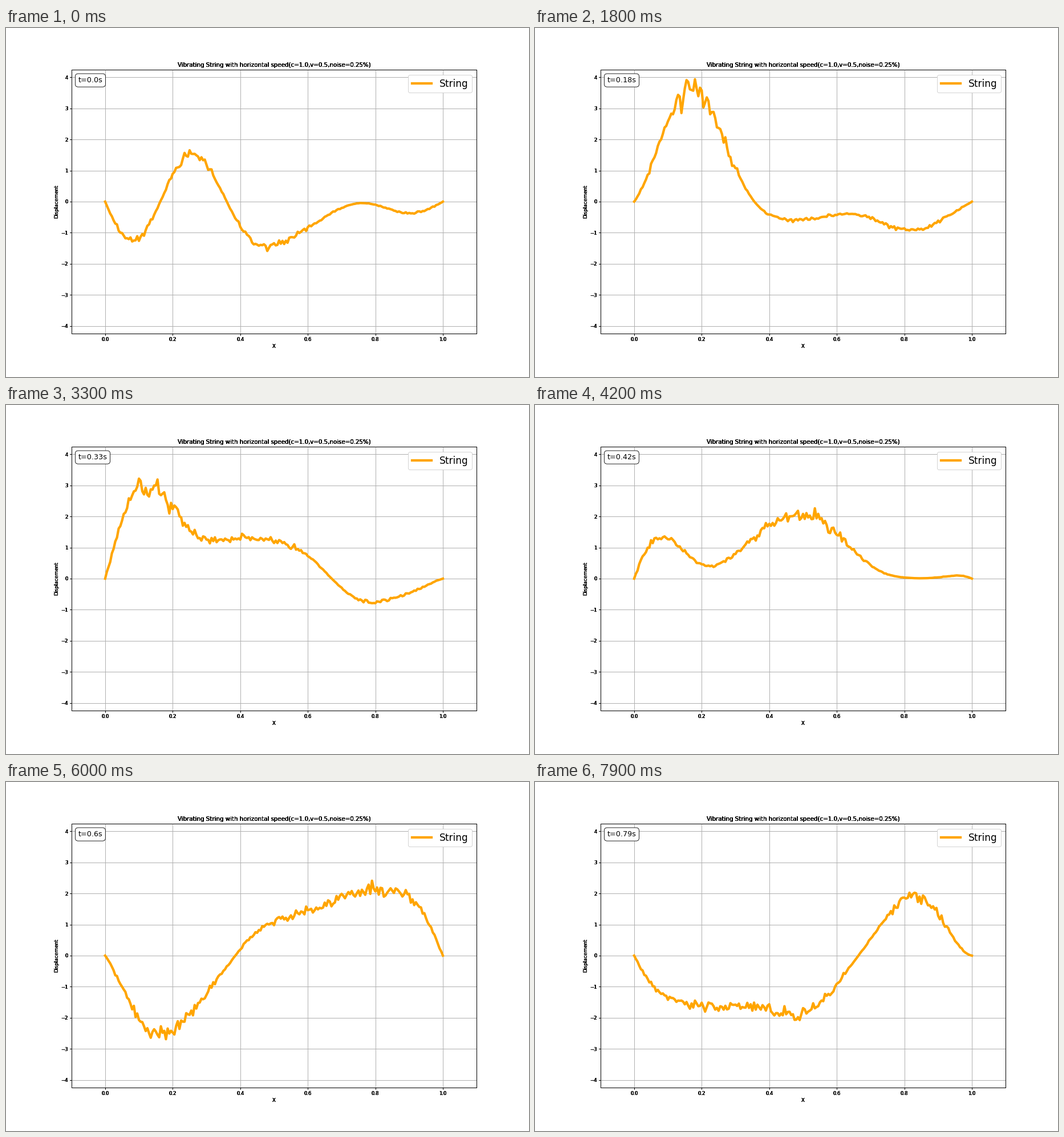
Animation of 917 by 611 pixels, one loop 8000 ms. Source, as a matplotlib script:

```python
import numpy as np
import matplotlib.pyplot as plt
from matplotlib.animation import FuncAnimation

np.random.seed(7)

DPI = 61.125
FRAMES, INTERVAL, DT = 80, 100, 0.01
C, V, NOISE = 1.0, 0.5, 0.05   # wave speed, transport speed, relative jitter
MODES = np.arange(1, 7)
LAYERS = 5                     # repeated drawing gives the heavy axis text


def basis(x, t):
    """Modes of a string fixed at both ends while travelling at speed V."""
    x, t = np.broadcast_arrays(x, t)
    phase = np.pi * (V * x + (C**2 - V**2) * t)[..., None] / C * MODES
    shape = np.sin(np.pi * x[..., None] * MODES)
    return np.concatenate([shape * np.cos(phase), shape * np.sin(phase)], axis=-1)


# Displacement at x = 0.1 ... 0.9 for a few times fixes the mode amplitudes.
poses = {
    0.00: [-1.12, 0.90, 1.20, -0.73, -1.33, -0.80, -0.22, -0.10, -0.37],
    0.18: [2.75, 3.35, 1.05, -0.42, -0.60, -0.42, -0.53, -0.87, -0.66],
    0.33: [2.85, 2.25, 1.25, 1.22, 1.20, 0.75, -0.30, -0.75, -0.48],
    0.50: [-0.50, -1.15, -0.03, 1.35, 2.15, 1.75, 1.28, 1.03, 0.87],
    0.60: [-2.10, -2.40, -1.15, 0.22, 1.10, 1.30, 2.00, 2.25, 1.90],
    0.69: [-2.18, -2.45, -1.87, -0.97, -0.40, 0.36, 1.53, 2.40, 2.38],
    0.79: [-1.33, -1.60, -1.62, -1.75, -1.85, -0.95, 0.60, 1.93, 1.45],
}
u = np.array(list(poses.values()))
A = basis(np.linspace(0.1, 0.9, 9), np.array(list(poses))[:, None])
w = 1 / (0.05 + 0.03 * np.abs(u))
amps = np.linalg.lstsq((A * w[..., None]).reshape(u.size, -1),
                       (u * w).ravel(), rcond=None)[0]

x = np.linspace(0, 1, 201)
jitter = np.random.normal(0, NOISE, (FRAMES, x.size))


def displacement(k):
    return basis(x, k * DT) @ amps * (1 + jitter[k])


def add_axes(fig):
    ax = fig.add_axes([0.125, 0.125, 0.775, 0.755], facecolor="none",
                      label=f"layer{len(fig.axes)}")
    ax.set(xlim=(-0.1, 1.1), ylim=(-4.24, 4.24), xlabel="X", ylabel="Displacement",
           xticks=np.linspace(0, 1, 6), yticks=range(-4, 5))
    ax.set_title("Vibrating String with horizontal speed(c=1.0,v=0.5,noise=0.25%)")
    ax.grid(True)
    return ax


plt.rcParams["font.family"] = "DejaVu Sans"
fig = plt.figure(figsize=((917 + 1e-6) / DPI, (611 + 1e-6) / DPI), dpi=DPI,
                 facecolor="white")
ax = [add_axes(fig) for _ in range(LAYERS)][-1]
line, = ax.plot(x, displacement(0), color="orange", lw=5, label="String")
ax.legend(loc="upper right", fontsize=20, framealpha=1)
clock = ax.text(-0.08, 3.84, "t=0.0s", fontsize=15, zorder=4,
                bbox=dict(boxstyle="round,pad=0.4", fc="white", ec="black"))


def update(k):
    line.set_ydata(displacement(k))
    clock.set_text(f"t={round(k * DT, 2)}s")
    return line, clock


anim = FuncAnimation(fig, update, frames=FRAMES, interval=INTERVAL,
                     repeat=True, repeat_delay=0)
plt.show()
```
